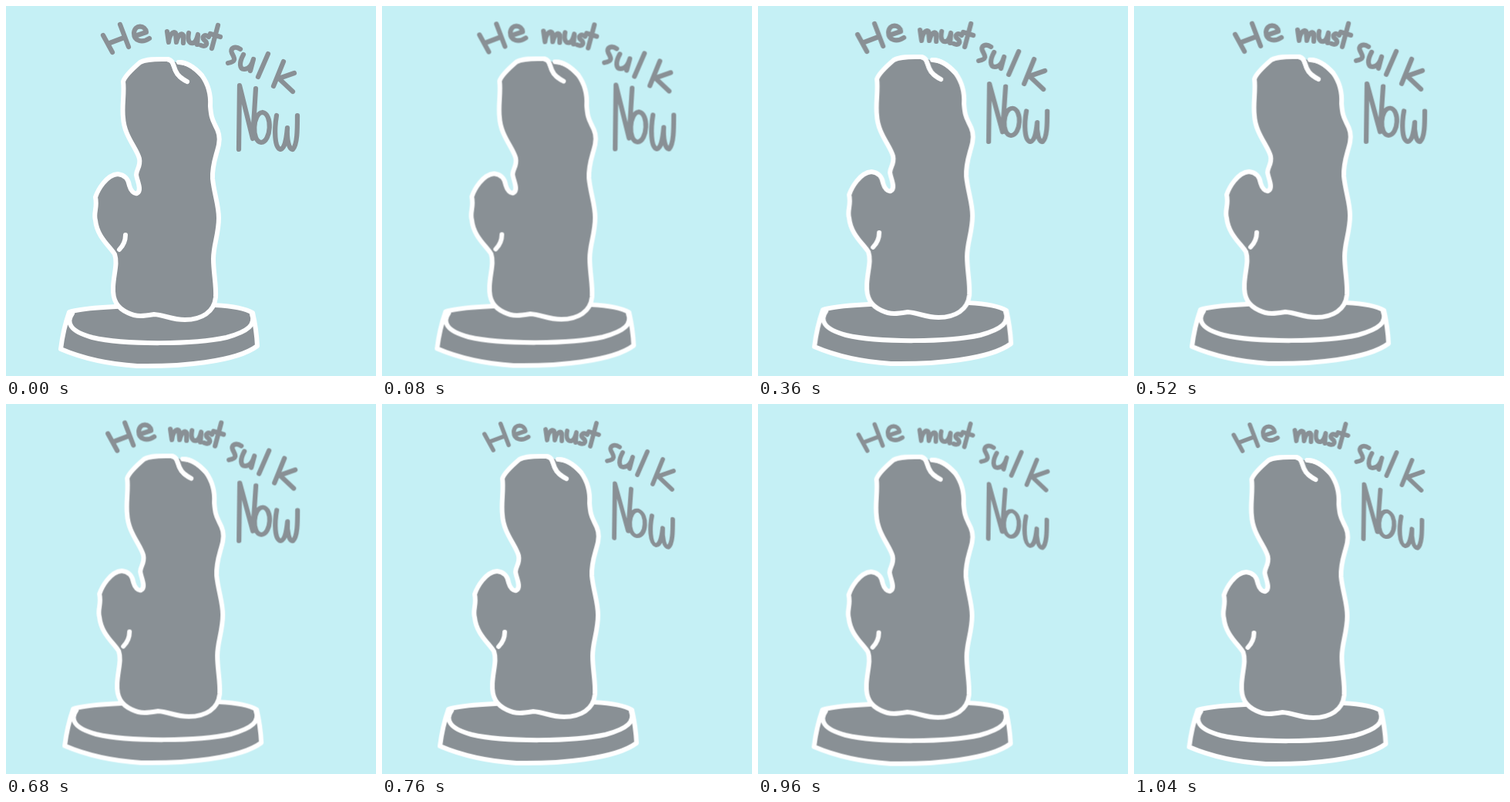
Animation of 480x480 px, one loop 1.08 s. Source, as an HTML page:

```html
<!DOCTYPE html>
<html lang="en">
<head>
<meta charset="utf-8">
<title>Rock statue</title>
<style>
  html, body { margin: 0; width: 100%; height: 100%; overflow: hidden; background: #c5f0f5; }
  svg { display: block; width: 100vw; height: 100vh; }

  .stone { fill: #899095; stroke: #fff; stroke-width: 6; }
  .crease { fill: none; stroke: #fff; stroke-width: 6; }
  .words { fill: none; stroke: #899095; stroke-width: 6.2; }
  .words path { vector-effect: non-scaling-stroke; }
  .stone, .crease, .words { stroke-linecap: round; stroke-linejoin: round; }

  /* The whole drawing drifts in 40 ms steps. */
  .drift { animation: drift 1080ms infinite; }
  @keyframes drift {
    0%     { transform: translate(0, 0); animation-timing-function: steps(5); }
    18.51% { transform: translate(1.2px, -1.5px); animation-timing-function: steps(4); }
    33.33% { transform: translate(2.2px, -3px); animation-timing-function: steps(4); }
    48.14% { transform: translate(4.2px, -3.2px); animation-timing-function: steps(4); }
    62.96% { transform: translate(5.2px, -1.6px); animation-timing-function: steps(4); }
    77.77% { transform: translate(3.2px, -.8px); animation-timing-function: steps(5); }
    96.29% { transform: translate(.6px, -.1px); animation-timing-function: steps(1); }
    100%   { transform: translate(0, 0); }
  }

  /* Three letterings take turns, a third of the loop each. */
  .words { animation: turn 1080ms step-end infinite; }
  .second { animation-delay: -720ms; }
  .third { animation-delay: -360ms; stroke-width: 5.8; }
  @keyframes turn {
    0% { visibility: visible; }
    33.33%, 100% { visibility: hidden; }
  }
</style>
</head>
<body>
<svg viewBox="0 0 480 480" role="img" aria-label="He must sulk Now">
  <defs>
    <path id="he" d="M126 38 L138 60 M148 24 L159 53 M132 49 L153 41
      M167 39 L182 34 C181 25 167 23 166 35 C166 46 177 48 186 42"/>
    <path id="must" d="M209 33 L211 47 C212 37 217 32 220 35 L221 47 C223 38 228 34 230 38 L230 48
      M237 35 C235 45 238 49 243 48 C247 46 248 41 249 37 L248 50
      M263 40 C258 36 253 40 257 44 C263 48 260 54 253 51
      M275 25 L267 55 M265 36 L278 40"/>
    <path id="sulk" d="M304 56 C297 51 290 55 293 61 C296 67 300 72 288 74
      M308 63 C302 74 303 82 309 82 C315 82 319 76 321 69 L317 84
      M340 62 L327 92
      M360 72 L347 104 M374 87 L354 94 L372 111"/>
    <path id="now" d="M302 186 L303 103 L320 172 L324 107
      M333 138 C320 138 318 176 331 177 C344 176 346 140 333 138
      M351 142 C348 160 348 184 356 186 C363 184 364 168 365 158 C364 172 367 187 372 186 C378 180 378 160 378 142"/>
  </defs>

  <g class="drift">
    <path class="stone" d="M71 445 Q74 420 82 397 C100 391 150 389 200 388 C250 387 300 386 320 398
      Q325 420 326 441 C298 462 225 468 170 467 C125 464 92 454 71 445 Z"/>
    <path class="crease" d="M86 399 C78 410 82 422 112 430 C155 440 245 439 286 430 C315 422 324 413 319 400"/>

    <path class="stone" d="M224 73 C235 73 245 80 254 90 C262 101 266 115 265 130
      C266 142 267 146 271 154 C276 163 278 170 276 180 C273 194 267 206 268 224
      C270 244 276 258 276 275 C276 296 269 310 269 328 C269 346 273 362 272 378
      C270 397 254 407 232 407 C215 407 206 401 192 400 C180 402 170 404 158 398
      C145 392 138 383 139 364 C140 346 145 334 141 322 C134 311 118 299 116 278
      C113 268 119 262 116 248 C119 239 130 219 145 218 C154 219 159 225 160 233
      C162 240 166 244 170 243 C177 239 170 227 169 219 C169 212 175 208 173 198
      C170 185 153 168 152 145 C150 130 154 113 152 98 C154 91 167 79 174 73
      C184 68 198 69 209 69 C217 70 217 77 220 84 C223 91 228 94 235 98"/>
    <path fill="#899095" d="M218 72 L225 75 L242 100 L235 98 C228 94 223 91 220 84 Z"/>
    <path class="crease" d="M224 73 C235 73 245 80 254 90 M209 69 C217 70 217 77 220 84 C223 91 228 94 235 98
      M155 297 C155 306 152 311 147 316"/>

    <g class="words first">
      <use href="#he"/><use href="#must"/><use href="#sulk"/><use href="#now"/>
    </g>
    <g class="words second">
      <use href="#he" transform="translate(1 2)"/>
      <use href="#must" transform="translate(-1 1)"/>
      <use href="#sulk" transform="translate(-4 0)"/>
      <use href="#now" transform="translate(-5 10) scale(1 .91)"/>
    </g>
    <g class="words third">
      <use href="#he" transform="translate(9 4) scale(.95)"/>
      <use href="#must" transform="translate(-1 1)"/>
      <use href="#sulk" transform="translate(0 1)"/>
      <use href="#now" transform="matrix(1 .17 0 .86 -5 -36)"/>
    </g>
  </g>
</svg>
</body>
</html>
```
